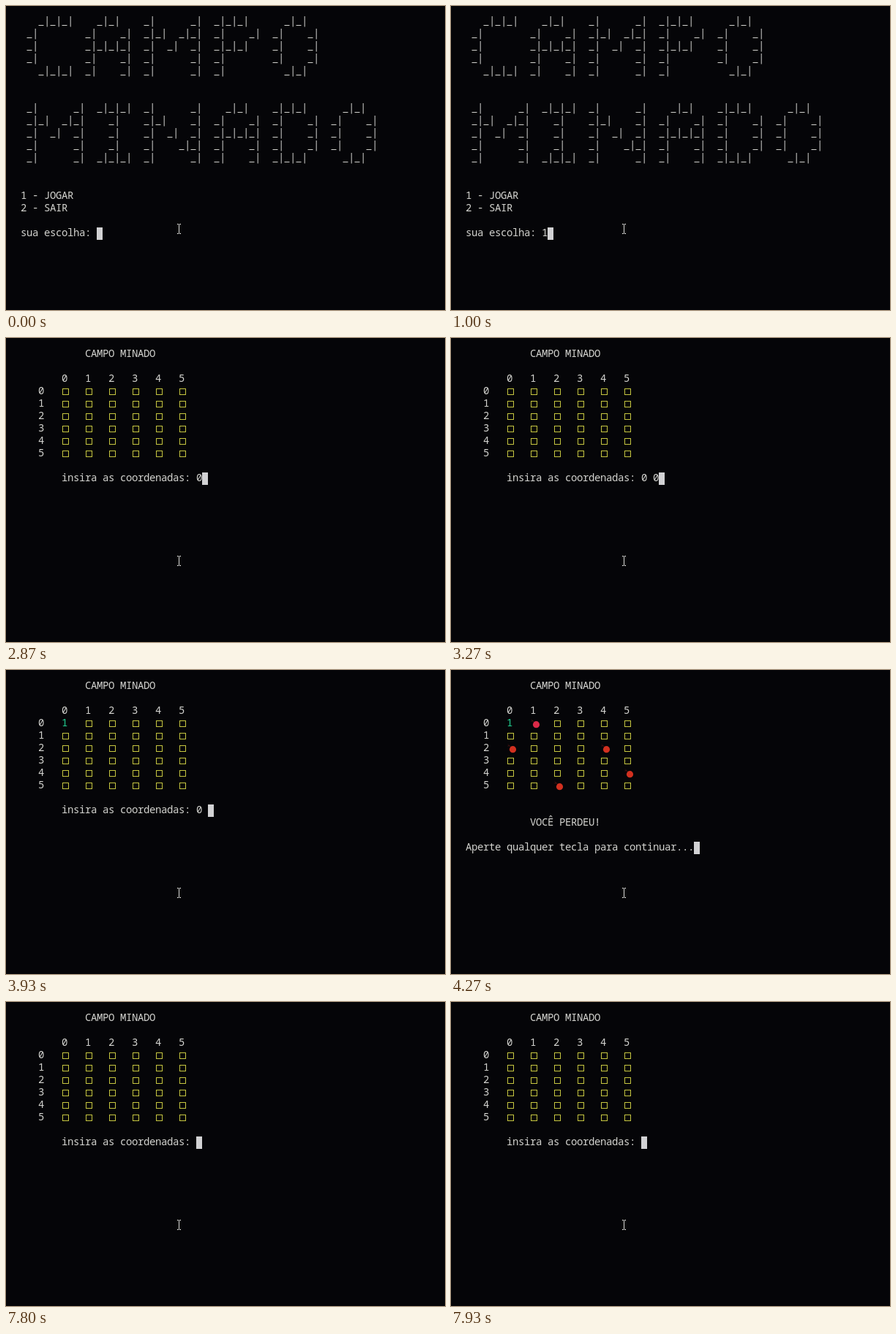
An HTML page for the animation above (8 s loop, 600x416 px).

```html
<!DOCTYPE html>
<html lang="pt">
<head>
<meta charset="utf-8">
<title>Campo Minado</title>
<style>
  html, body { margin: 0; width: 100%; height: 100%; overflow: hidden; background: #050508; }
  svg { display: block; width: 600px; height: 416px; }
  text {
    font: 14px "Noto Sans Mono", "DejaVu Sans Mono", monospace;
    letter-spacing: -0.4px;
    fill: #d3d3cf;
    white-space: pre;
  }
  .art { stroke: #d3d3cf; fill: none; }
  .cell { stroke: #c6c640; fill: none; }
</style>
</head>
<body>
<svg id="stage" viewBox="0 0 600 416">
  <g id="menu"></g>
  <g id="game"></g>
  <rect id="caret" width="8" height="17" fill="#d2d2d4"/>
  <g fill="none">
    <path d="M234 298.5h2m1 0h2M236.5 299v12M234 311.5h2m1 0h2" stroke="#000" stroke-width="3"/>
    <path d="M234 298.5h2m1 0h2M236.5 299v12M234 311.5h2m1 0h2" stroke="#e4e4e4"/>
  </g>
</svg>
<script>
const LOOP = 8000, CW = 8, LH = 17, SIZE = 6;
const $ = id => document.getElementById(id);
const colX = c => 4 + c * CW;
const rowY = r => 14 + r * LH;

function add(parent, tag, attrs) {
  const el = document.createElementNS("http://www.w3.org/2000/svg", tag);
  for (const k in attrs) el.setAttribute(k, attrs[k]);
  return parent.appendChild(el);
}

function print(parent, col, row, str = "", fill) {
  const el = add(parent, "text", { x: colX(col), y: rowY(row) + 12 });
  if (fill) el.style.fill = fill;
  el.textContent = str;
  return el;
}

// Banner letters: every # is one "_|" pair.
const LETTERS = {
  C: [" ###", "#", "#", "#", " ###"],
  A: [" ##", "#  #", "####", "#  #", "#  #"],
  M: ["#   #", "## ##", "# # #", "#   #", "#   #"],
  P: ["###", "#  #", "###", "#", "#"],
  O: [" ##", "#  #", "#  #", "#  #", " ##"],
  I: ["###", " #", " #", " #", "###"],
  N: ["#   #", "##  #", "# # #", "#  ##", "#   #"],
  D: ["###", "#  #", "#  #", "#  #", "###"]
};

function banner(parent, word, row) {
  let col = 3, d = "";
  for (const ch of word) {
    const lines = LETTERS[ch];
    lines.forEach((line, r) => [...line].forEach((dot, i) => {
      if (dot !== "#") return;
      const x = colX(col + i * 2), y = rowY(row + r);
      d += `M${x + 0.5} ${y + 12.5}h7M${x + 12.2} ${y}v14.5`;
    }));
    col += 2 * (Math.max(...lines.map(l => l.length)) + 1);
  }
  add(parent, "path", { d, class: "art" });
}

// Menu screen
const menu = $("menu");
banner(menu, "CAMPO", 0);
banner(menu, "MINADO", 7);
print(menu, 2, 14, "1 - JOGAR");
print(menu, 2, 15, "2 - SAIR");
const choice = print(menu, 2, 17);

// Game screen
const game = $("game"), cells = {};
print(game, 13, 0, "CAMPO MINADO");
for (let i = 0; i < SIZE; i++) {
  print(game, 9 + i * 4, 2, i);
  print(game, 5, 3 + i, i);
  for (let j = 0; j < SIZE; j++) {
    cells[[i, j]] = add(game, "rect", {
      x: colX(9 + j * 4) + 1.5, y: rowY(3 + i) + 4.5, width: 8, height: 8, class: "cell"
    });
  }
}
const hint = print(game, 9, 3, "1", "#22cf92");
const prompt = print(game, 9, 10);
const lost = add(game, "g", {});
print(lost, 13, 11, "VOCÊ PERDEU!");
print(lost, 2, 13, "Aperte qualquer tecla para continuar...");

const MINES = [[0, 1], [2, 0], [2, 4], [4, 5], [5, 2]];
for (const [r, c] of MINES) {
  const x = colX(9 + c * 4), y = rowY(3 + r);
  add(lost, "path", {
    d: `M${x + 6} ${y + 7}l-2 -2.5l-2.5 .5M${x + 2} ${y + 2.5}l1 1`,
    stroke: "#4a1512", fill: "none"
  });
  add(lost, "circle", { cx: x + 8.5, cy: y + 9.7, r: 4.6, fill: r ? "#d2301f" : "#dc2a48" });
}

// [start, screen, typed text]
const STEPS = [
  [0, "menu", ""], [1000, "menu", "1"],
  [1600, "board", ""], [2870, "board", "0"], [3070, "board", "0 "], [3200, "board", "0 0"],
  [3470, "open", ""], [3730, "open", "0"], [3930, "open", "0 "], [4000, "open", "0 1"],
  [4200, "lost", ""],
  [6600, "menu", ""], [7270, "menu", "1"],
  [7800, "board", ""]
];

const show = (el, on) => el.setAttribute("display", on ? "inline" : "none");

function caretAt(col, row) {
  $("caret").setAttribute("x", colX(col));
  $("caret").setAttribute("y", rowY(row));
}

let current;
function render(t) {
  const step = STEPS.filter(s => s[0] <= t).pop();
  if (step === current) return;
  current = step;
  const [, screen, typed] = step;
  const isMenu = screen === "menu", isLost = screen === "lost";
  const opened = isLost || screen === "open";
  show(menu, isMenu);
  show(game, !isMenu);
  show(lost, isLost);
  show(prompt, !isLost);
  show(hint, opened);
  show(cells[[0, 0]], !opened);
  for (const m of MINES) show(cells[m], !isLost);
  choice.textContent = "sua escolha: " + typed;
  prompt.textContent = "insira as coordenadas: " + typed;
  if (isMenu) caretAt(15 + typed.length, 17);
  else if (isLost) caretAt(41, 13);
  else caretAt(32 + typed.length, 10);
}

const start = performance.now();
function tick() {
  render((performance.now() - start) % LOOP);
  requestAnimationFrame(tick);
}
tick();
</script>
</body>
</html>
```
